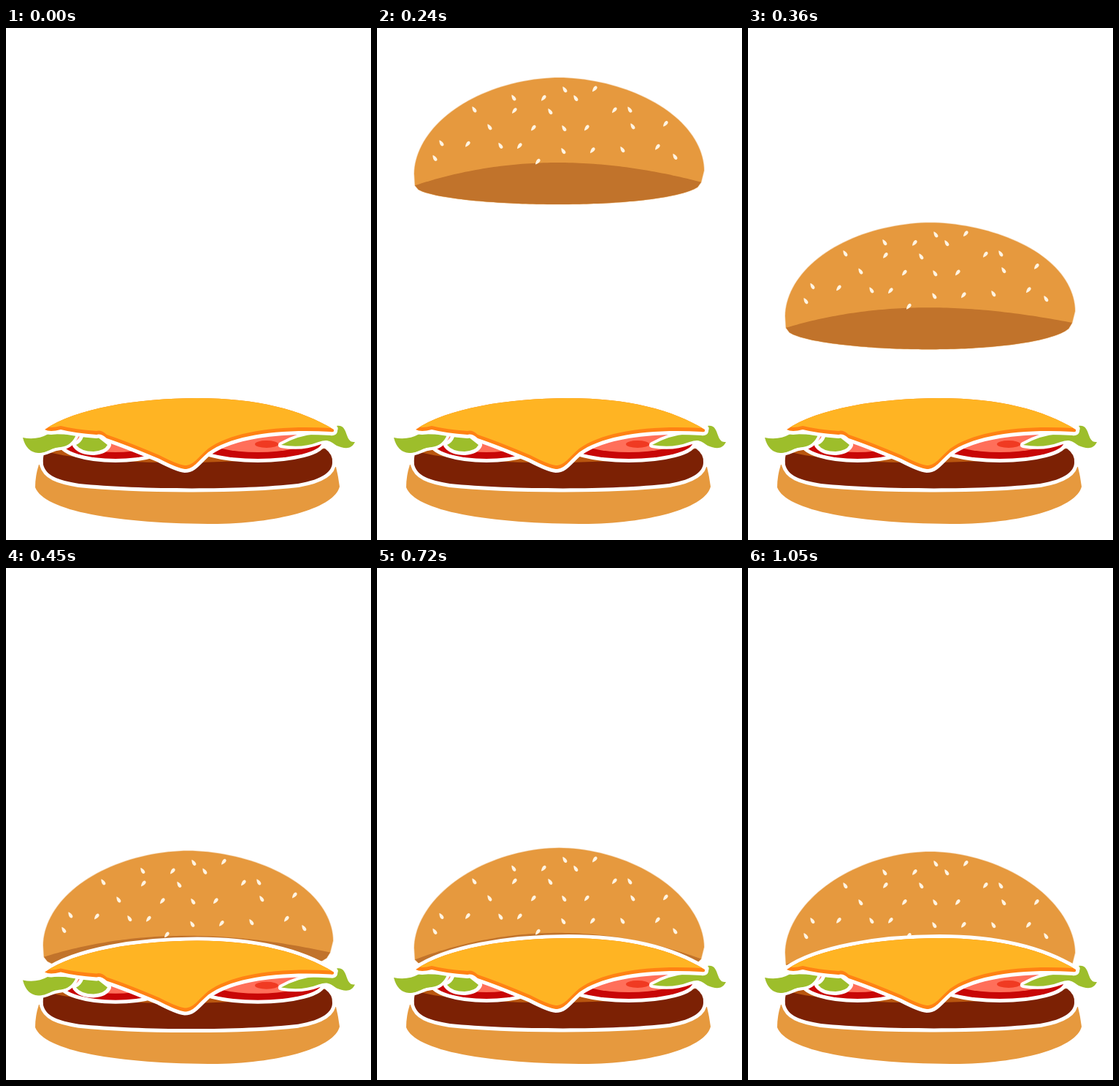
An HTML page with a canvas for the animation above (1350 ms loop, 500 by 700 pixels).

```html
<!DOCTYPE html>
<html>
<head>
<meta charset="utf-8">
<style>
  html, body { margin: 0; width: 100%; height: 100%; overflow: hidden; background: #fff; }
  canvas { display: block; }
</style>
</head>
<body>
<canvas id="stage" width="500" height="700"></canvas>
<script>
const ctx = document.getElementById('stage').getContext('2d');
const LOOP = 1350, STEP = 30, LAST = 1050, IMPACT = 400;
const BREAD = '#e6993e', SHADE = '#c1732b', GREEN = '#9dbe2b';

const clamp = v => Math.max(0, Math.min(1, v));
const hump = (t, length) => Math.sin(Math.PI * clamp((t - IMPACT) / length));

// Accelerating fall, then a small slow bounce
const crownY = t => t < IMPACT
  ? 18 + 50 * Math.max(0, (t - 70) / 170) ** 3
  : 388 - 5.2 * hump(t, LAST - IMPACT);
// How far the rim curls up
const curl = t => t < IMPACT ? .04 * (t - 15) : 15 * (1 - clamp((t - IMPACT) / 500)) ** 2;
const press = t => 5 * hump(t, 205);

const shape = d => new Path2D(d);
const bottomBun = shape('M45 597Q40 612 40 628C52 660 150 678 290 678C380 676 450 655 457 627Q455 612 452 600Z');
const patty = shape('M53 578Q50 588 51 597C55 612 70 618 100 623C180 631 320 632 400 623C435 617 447 606 447 594Q448 583 437 575Z');
const pattyFace = shape('M55 579C130 600 360 600 437 575L300 560L100 560Z');
const leafLeft = shape('M23 560Q42 564 58 555L96 556Q90 571 75 573C60 574 58 581 44 581Q28 580 23 560Z');
const leafMid = shape('M96 570Q103 579 120 579Q135 578 139 570L125 559L106 559Q103 567 96 570Z');
const leafRight = shape('M377 570Q400 557 425 555L452 553Q457 548 453 544C470 541 463 568 478 566C473 577 463 575 453 571C443 564 440 562 428 566Q405 575 377 570Z');
const cheese = shape('M53 549C95 520 180 506 262 506S405 522 449 549Q450 553 445 552C370 548 310 557 277 580C262 593 257 603 245 603Q235 602 210 589Q165 570 138 561Q130 554 124 556Q95 554 75 549Q60 553 53 549Z');

// Rows of sesame: height below the crown, then positions across
const sesame = [
  [16, 257, 298], [28, 187, 228, 272], [46, 133, 188, 237, 325, 346],
  [69, 154, 214, 256, 287, 350, 395], [94, 88, 124, 169, 195],
  [100, 255, 295, 336, 384], [115, 79, 220, 408]
];

function fill(path, color, rim = 0) {
  if (rim) {
    ctx.strokeStyle = '#fff';
    ctx.lineWidth = rim * 2;
    ctx.stroke(path);
  }
  ctx.fillStyle = color;
  ctx.fill(path);
}

function shifted(dy, draw) {
  ctx.save();
  ctx.translate(0, dy);
  draw();
  ctx.restore();
}

function oval(x, y, rx, ry) {
  const path = new Path2D();
  path.ellipse(x, y, rx, ry, 0, 0, 7);
  return path;
}

// Path through point(u) for u from -1 to 1 and back along the second curve
function between(there, back) {
  const path = new Path2D(), n = 80;
  for (let i = 0; i <= n; i++) path.lineTo(...there(2 * i / n - 1));
  for (let i = n; i >= 0; i--) path.lineTo(...back(2 * i / n - 1));
  path.closePath();
  return path;
}

function seed(x, y, tilt) {
  ctx.save();
  ctx.translate(x, y);
  ctx.rotate(tilt);
  fill(shape('M-4.8 0C-1 -2.7 4.6 -3.3 4.6 0C4.6 3.3 -1 2.7 -4.8 0Z'), '#fff4e2');
  ctx.restore();
}

function topBun(t) {
  const top = crownY(t), bend = curl(t);
  const lift = u => bend * (1 + .25 * u) * u * u;
  const dome = v => {
    const a = v * Math.PI / 2, power = 2 / 1.87;
    const u = Math.sign(v) * Math.abs(Math.sin(a)) ** power;
    return [249.5 + 198.5 * u, top + 138 * (1 - Math.max(0, Math.cos(a)) ** power) - lift(u)];
  };
  const arch = u => [248 + 196 * u, top + 116 + 38 * u * u - lift(u)];
  const rim = u => {
    const tip = 154 - bend * (1 + .25 * u);
    return [248 + 196 * u, top + tip + (173 - tip) * Math.sqrt(1 - u * u)];
  };
  const crust = between(dome, rim);
  ctx.strokeStyle = 'rgba(230,153,62,.35)';
  ctx.lineWidth = 1.5;
  ctx.stroke(crust);
  fill(crust, BREAD);
  fill(between(arch, rim), SHADE);
  for (const [y, ...row] of sesame)
    row.forEach((x, i) => seed(x, top + y - lift((x - 248) / 196), i % 2 ? -.9 : 1));
}

function tomato(x, rx) {
  fill(oval(x, 566, rx, 23), '#c80606', 5);
  fill(oval(x, 564, rx * .78, 16), '#ff6f5a');
}

function filling(dy) {
  shifted(dy * .2, () => {
    fill(patty, '#7c2104', 5);
    fill(pattyFace, '#b9560f');
  });
  shifted(dy * .5, () => {
    tomato(150, 74);
    tomato(345, 88);
    fill(oval(357, 569, 16, 5), '#f03a22');
  });
  shifted(dy, () => {
    fill(leafMid, GREEN, 5);
    fill(leafLeft, GREEN, 4);
    fill(leafRight, GREEN, 4);
    fill(cheese, '#ff8213', 5);
    ctx.clip(cheese);
    ctx.translate(0, -5);
    fill(cheese, '#ffb423');
  });
}

function frame(now) {
  const t = Math.min(LAST, Math.floor(now % LOOP / STEP) * STEP);
  ctx.fillStyle = '#fff';
  ctx.fillRect(0, 0, 500, 700);
  ctx.lineJoin = 'round';
  fill(bottomBun, BREAD);
  if (t >= STEP) topBun(t);
  filling(press(t));
}

const start = performance.now();
function tick() {
  frame(performance.now() - start);
  requestAnimationFrame(tick);
}
tick();
</script>
</body>
</html>
```
